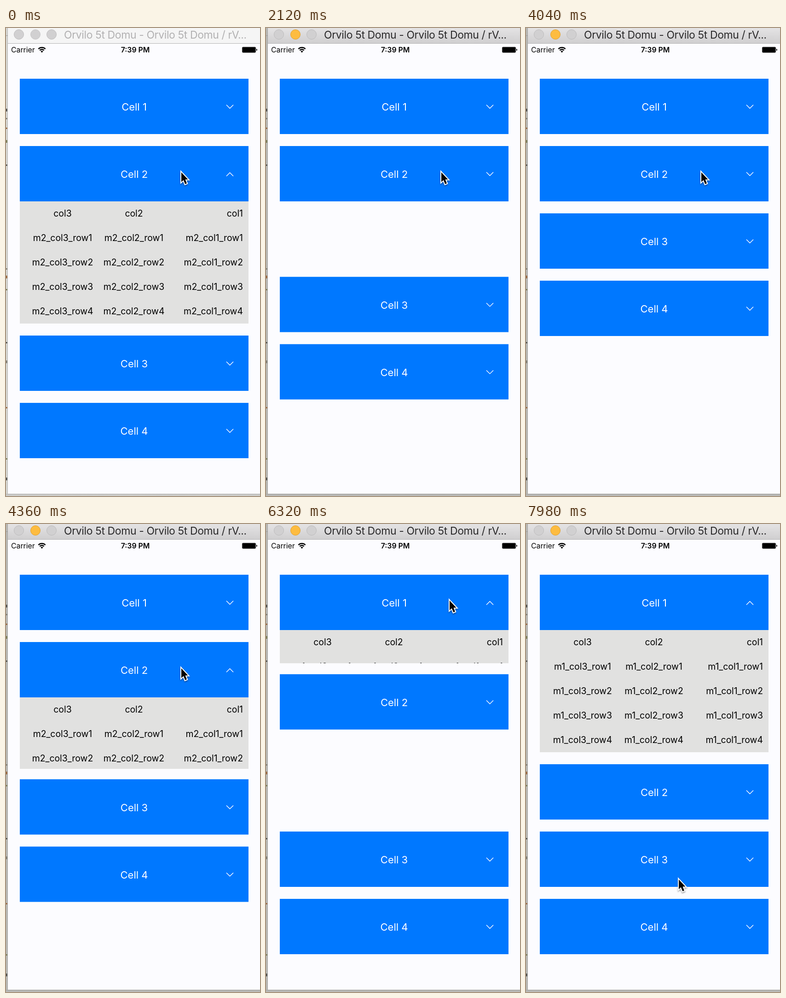
Write an HTML page that moves like this. It is 552 by 1015 pixels and loops after 8 s.

```html
<!DOCTYPE html>
<html lang="en">
<head>
<meta charset="utf-8">
<title>Accordion demo</title>
<style>
  html, body { margin: 0; width: 100%; height: 100%; overflow: hidden; }
  body { position: relative; font-family: Inter, Roboto, sans-serif; background: #d3d3d0; }
  div, svg { position: absolute; }
  .anim { animation: 8s linear infinite both; }

  /* Desktop behind the window */
  #desk { inset: 0; background: #b8b8b4; animation-name: desk; }
  #code { left: 0; top: 0; width: 4px; height: 1015px; }
  #foot { left: 0; top: 1010px; width: 552px; height: 5px; background: linear-gradient(#8f8f8f66, #d0d0d055); }

  /* Window */
  #win { left: 4px; top: 0; width: 548px; height: 1010px; background: #fcfcff; }
  #bar { left: 4px; top: 0; width: 548px; height: 33px; border-bottom: 1px solid #b4b3b4;
         background: linear-gradient(#e4e3e4, #d0cfd0); }
  #idle { left: 4px; top: 0; width: 548px; height: 33px; background: #f5f5f5; animation-name: idle; }
  #title { left: 126px; top: 0; line-height: 30px; font-size: 23px; letter-spacing: -.4px;
           white-space: nowrap; color: #2a292a; animation-name: title; }
  .dot { top: 3px; width: 20px; height: 20px; border: 1px solid #bcbbbc; border-radius: 50%; background: #d1d0d1; }
  #mid { background: #fdbc40; border-color: #dfa032; animation-name: mid; }
  .status { top: 37px; line-height: 21px; font-size: 15.8px; white-space: nowrap; color: #000; }
  #clock { left: 181px; width: 200px; text-align: center; font-weight: 600; }

  /* Accordion */
  .cell { left: 30px; width: 497px; height: 120px; background: #0078ff; color: #fff;
          font-size: 22px; line-height: 122px; text-align: center; }
  .chev { left: 447px; top: 54.5px; width: 20px; height: 12px; fill: none; stroke: #fff; stroke-width: 1.4; }
  .sheet { left: 30px; width: 497px; height: 0; overflow: hidden; background: #e1e1e0; color: #000; }
  .row { left: 15.5px; display: grid; grid-template-columns: 155px 155px 159.5px;
         font-size: 19.4px; line-height: 53px; text-align: center; white-space: nowrap; }
  .row span:last-child { text-align: right; }

  #cell2 { animation-name: drop; }
  #cell3, #cell4 { animation-name: shift; }
  #sheet1 { animation-name: open1; }
  #sheet2 { animation-name: open2; }
  #cell1 .chev { animation-name: flip1; }
  #cell2 .chev { animation-name: flip2; }
  #cursor { left: -6px; top: -8px; width: 34px; height: 44px; animation-name: point;
            filter: drop-shadow(0 2px 1.5px #0006); }

  @keyframes desk { 0%, 23.25% { background: #d6d6d2; } 23.26%, 100% { background: #b8b8b4; } }
  @keyframes idle { 0%, 23.25% { opacity: 1; } 23.26%, 100% { opacity: 0; } }
  @keyframes title { 0%, 23.25% { color: #b2b1b2; } 23.26%, 100% { color: #2a292a; } }
  @keyframes mid {
    0%, 23.25% { background: #d1d0d1; border-color: #c6c5c6; }
    23.26%, 100% { background: #fdbc40; border-color: #dfa032; }
  }
  @keyframes shift {
    0% { transform: translateY(265px); }
    24.68% { transform: translateY(265px); animation-timing-function: ease-in-out; }
    28.43% { transform: none; }
    52.48% { transform: none; animation-timing-function: ease-in-out; }
    56.23%, 100% { transform: translateY(265px); }
  }
  @keyframes drop {
    0% { transform: none; }
    77.68% { transform: none; animation-timing-function: ease-in-out; }
    81.43%, 100% { transform: translateY(265px); }
  }
  @keyframes open1 {
    0% { height: 0; }
    77.66% { height: 0; animation-timing-function: ease-in-out; }
    81.41%, 100% { height: 265px; }
  }
  @keyframes open2 {
    0%, 24.67% { height: 265px; }
    24.68% { height: 0; }
    52.45% { height: 0; animation-timing-function: ease-in-out; }
    56.2%, 77.66% { height: 265px; }
    77.67%, 100% { height: 0; }
  }
  @keyframes flip1 { 0%, 77.66% { transform: none; } 77.67%, 100% { transform: scaleY(-1); } }
  @keyframes flip2 {
    0%, 24.67% { transform: scaleY(-1); }
    24.68%, 52.46% { transform: none; }
    52.47%, 77.66% { transform: scaleY(-1); }
    77.67%, 100% { transform: none; }
  }
  @keyframes point {
    0% { transform: translate(381px, 313px); }
    60% { transform: translate(381px, 313px); animation-timing-function: ease-in-out; }
    66.75% { transform: translate(397px, 185px); animation-timing-function: ease-out; }
    69% { transform: translate(399px, 166px); }
    89% { transform: translate(399px, 166px); animation-timing-function: ease-in-out; }
    98.5%, 100% { transform: translate(332px, 771px); }
  }
</style>
</head>
<body>
<div id="desk" class="anim"></div>
<svg id="code"></svg>
<div id="foot"></div>
<div id="win"></div>
<div id="bar"></div>
<div id="idle" class="anim"></div>
<div class="dot" style="left:17px"></div>
<div class="dot anim" id="mid" style="left:53px"></div>
<div class="dot" style="left:88px"></div>
<div id="title" class="anim">Orvilo 5t Domu - Orvilo 5t Domu / rV...</div>

<div class="status" style="left:11px">Carrier</div>
<svg style="left:68px;top:39px" width="20" height="16" fill="none" stroke="#000" stroke-width="2.5">
  <path d="M2.4 6.4A10.8 10.8 0 0 1 17.6 6.4M5.4 9.5A6.5 6.5 0 0 1 14.6 9.5"/>
  <path d="M10 14.5L7.4 11.7A3.7 3.7 0 0 1 12.6 11.7Z" fill="#000" stroke="none"/>
</svg>
<div class="status" id="clock">7:39 PM</div>
<svg style="left:512px;top:40px" width="36" height="15">
  <rect x="1.3" y="1.3" width="29.4" height="12" rx="2" fill="#000" stroke="#555" stroke-width=".8"/>
  <path d="M32 5Q34 5.4 34 7.3T32 9.6Z"/>
</svg>

<main id="list"></main>

<svg id="cursor" class="anim" viewBox="-6 -8 34 44">
  <path d="M0 0V21L4.7 16.8L8.3 25.6L12 24L8.5 15.5H14.5Z" stroke="#fff" stroke-width="4" paint-order="stroke"/>
</svg>

<script>
  const range = n => Array.from({ length: n }, (_, i) => i);

  const row = (n, r) => {
    const cells = [3, 2, 1].map(c => `<span>${r ? `m${n}_col${c}_row${r}` : `col${c}`}</span>`);
    return `<div class="row" style="top:${r * 53}px">${cells.join('')}</div>`;
  };

  const sheet = (n, top) =>
    `<div class="sheet anim" id="sheet${n}" style="top:${top}px">${range(5).map(r => row(n, r)).join('')}</div>`;

  const cell = n => {
    const top = 110 + (n - 1) * 146;
    return `<div class="cell anim" id="cell${n}" style="top:${top}px">Cell ${n}
      <svg class="chev anim" viewBox="0 0 20 12"><path d="M2 1.8L9.5 9.2L17 1.8"/></svg></div>`
      + (n < 3 ? sheet(n, top + 120) : '');
  };

  document.getElementById('list').innerHTML = range(4).map(i => cell(i + 1)).join('');

  // Slivers of the editor showing left of the window
  const marks = [175, 195, 216, 243, 296, 521, 537, 566, 681, 721, 822, 933, 975];
  const inks = ['#4a4a48', '#7d7a70', '#9a6236', '#77794f'];
  document.getElementById('code').innerHTML = marks.map((y, i) =>
    `<rect y="${y}" width="2.5" height="${i % 3 ? 3 : 6}" fill="${inks[i % 4]}"/>`).join('')
    + '<rect y="16" width="4" height="1" fill="#999"/><rect x="3" width="1" height="1010" fill="#8886"/>';
</script>
</body>
</html>
```
